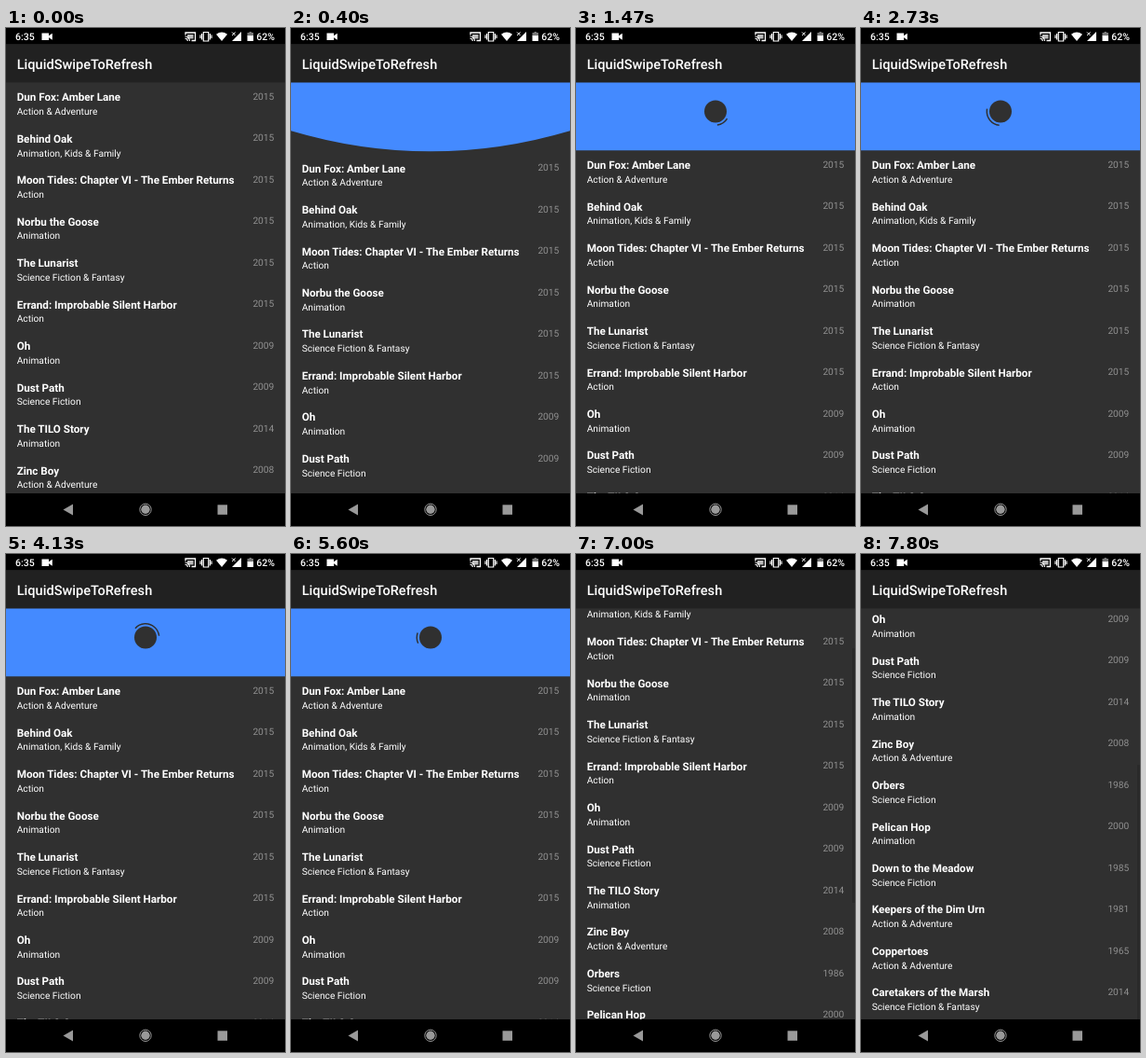
Recreate the animation shown at these times as an HTML page with a canvas. Size 300 by 534 pixels, loop 8000 ms.

```html
<!DOCTYPE html>
<html lang="en">
<head>
<meta charset="utf-8">
<title>LiquidSwipeToRefresh</title>
<style>
html, body { margin: 0; width: 100%; height: 100%; overflow: hidden; background: #000; }
canvas { display: block; width: 300px; height: 534px; }
</style>
</head>
<body>
<canvas id="stage"></canvas>
<script>
const canvas = document.getElementById('stage');
const ctx = canvas.getContext('2d');
const dpr = window.devicePixelRatio || 1;
canvas.width = 300 * dpr;
canvas.height = 534 * dpr;
ctx.textRendering = 'geometricPrecision';

const LOOP = 8000;
const BAR = 17.5, TOP = 58.33, BOTTOM = 499, ROW = 44.48;
const VIEW = BOTTOM - TOP;
const BASE = 72.9;        // height of the open refresh area
const RELEASE = 965;      // finger leaves the screen
const SPINNER_Y = 89.5;
const DARK = '#303030', BLUE = '#448aff', GREY = '#909090';

const movies = [
  ['Dun Fox: Amber Lane', 'Action & Adventure', 2015],
  ['Behind Oak', 'Animation, Kids & Family', 2015],
  ['Moon Tides: Chapter VI - The Ember Returns', 'Action', 2015],
  ['Norbu the Goose', 'Animation', 2015],
  ['The Lunarist', 'Science Fiction & Fantasy', 2015],
  ['Errand: Improbable Silent Harbor', 'Action', 2015],
  ['Oh', 'Animation', 2009],
  ['Dust Path', 'Science Fiction', 2009],
  ['The TILO Story', 'Animation', 2014],
  ['Zinc Boy', 'Action & Adventure', 2008],
  ['Orbers', 'Science Fiction', 1986],
  ['Pelican Hop', 'Animation', 2000],
  ['Down to the Meadow', 'Science Fiction', 1985],
  ['Keepers of the Dim Urn', 'Action & Adventure', 1981],
  ['Coppertoes', 'Action & Adventure', 1965],
  ['Caretakers of the Marsh', 'Science Fiction & Fantasy', 2014]
];
const CONTENT = movies.length * ROW;

const span = (t, a, b) => Math.min(1, Math.max(0, (t - a) / (b - a)));
const easeOut = (u, p = 3) => 1 - (1 - u) ** p;
const rad = deg => deg * Math.PI / 180;

function text(str, x, y, size, weight, color, align = 'left') {
  ctx.font = `${weight} ${size}px Roboto, sans-serif`;
  ctx.fillStyle = color;
  ctx.textAlign = align;
  ctx.fillText(str, x, y);
}

function rect(x, y, w, h, color) {
  ctx.fillStyle = color;
  ctx.fillRect(x, y, w, h);
}

function fill(path, color) {
  ctx.fillStyle = color;
  ctx.fill(new Path2D(path));
}

function stroke(path, color, width) {
  ctx.strokeStyle = color;
  ctx.lineWidth = width;
  ctx.stroke(new Path2D(path));
}

function disc(x, y, r, color) {
  ctx.fillStyle = color;
  ctx.beginPath();
  ctx.arc(x, y, r, 0, 7);
  ctx.fill();
}

// Height of the refresh area, sag of its edge, shift and scroll of the list.
function layout(t) {
  if (t < RELEASE) {
    const pull = easeOut(span(t, 130, 930));
    return { base: BASE * pull, sag: 31.2 * pull, shift: 107.4 * pull, scroll: 0 };
  }
  if (t < 5870) {
    const s = (t - RELEASE) / 1000;
    return {
      base: BASE,
      sag: t < 1870 ? 31.2 * Math.exp(-7 * s) * Math.cos(5 * Math.PI * s) : 0,
      shift: BASE + 34.4 * (1 - easeOut(span(t, RELEASE, 1215))),
      scroll: 0
    };
  }
  const base = BASE * (1 - span(t, 5870, 6395)) ** 1.3;
  const scroll = (CONTENT - VIEW) * easeOut(span(t, 6892, 7800), 2.3);
  return { base, sag: 0, shift: base - scroll, scroll };
}

function drawHill(edge, height) {
  if (height <= 0) return;
  const y = edge - height;
  fill(`M100 ${edge + 1}C130 ${edge} 132 ${y} 150 ${y}S170 ${edge} 200 ${edge + 1}Z`, DARK);
}

function drawSpinner(t) {
  if (t < 1060 || t > 5870) return;
  const sunk = 57 * (1 - easeOut(span(t, 1060, 1250)) + span(t, 5680, 5870) ** 2);
  disc(150, SPINNER_Y + sunk, 12, DARK);
  if (t < 1440 || t > 5680) return;

  const turns = Math.min(4, (t - 1440) / 1040);
  const n = Math.floor(turns), q = turns - n;
  const tail = 27 + 392 * n + 150 * Math.min(q, 0.5) + 634 * Math.max(0, q - 0.5);
  const sweep = 45 + 210 * Math.min(q, 1 - q);
  ctx.globalAlpha = 1 - span(t, 5610, 5680);
  ctx.strokeStyle = DARK;
  ctx.lineWidth = 1.5;
  ctx.beginPath();
  ctx.arc(150, SPINNER_Y, 14.7, rad(tail), rad(tail + sweep));
  ctx.stroke();
  ctx.globalAlpha = 1;
}

function drawList(t) {
  const { base, sag, shift, scroll } = layout(t);
  const edge = TOP + base;
  rect(0, BAR, 300, BOTTOM - BAR, DARK);
  ctx.save();
  ctx.beginPath();
  ctx.rect(0, BAR, 300, BOTTOM - BAR);
  ctx.clip();
  if (base > 0) fill(`M0 ${TOP}H300V${edge}Q150 ${edge + 2 * sag} 0 ${edge}Z`, BLUE);

  const peak = span(t, 1060, 1160) - span(t, 1160, 1300) ** 2
             + span(t, 5700, 5780) - span(t, 5780, 5870) ** 2;
  drawHill(edge + sag, 38 * peak);
  drawSpinner(t);

  movies.forEach(([title, genre, year], i) => {
    const y = TOP + i * ROW + shift;
    if (y < TOP - ROW || y > BOTTOM) return;
    text(title, 11.67, y + 19.9, 11.67, 700, '#fff');
    text(genre, 11.67, y + 34.7, 10.2, 400, '#fff');
    text(year, 288.3, y + 18.6, 10.2, 400, GREY, 'right');
  });

  if (scroll > 0) {
    const scale = VIEW / CONTENT;
    rect(297, TOP + scroll * scale, 3, VIEW * scale, 'rgba(0,0,0,.15)');
  }
  ctx.restore();
}

function drawStatusBar() {
  const W = '#fff';
  text('6:35', 10, 13.2, 10.5, 500, W);
  text('62%', 289, 13.2, 10.5, 500, W, 'right');
  // camera
  fill('M38.5 5.5H46V8.2L49.8 5.8V12.7L46 10.3V13H38.5Z', W);
  // cast
  stroke('M193 7.5V5H203.5V13.5H199.5', W, 1.3);
  rect(195, 7, 6.5, 4.5, '#bbb');
  stroke('M192.5 9A5 5 0 0 1 197.5 14M192.5 11.2A2.8 2.8 0 0 1 195.3 14', W, 1.1);
  // vibrate
  stroke('M212.3 4.5H217.7V14H212.3ZM210.6 6V12.5M219.4 6V12.5M209 7.5V11M221 7.5V11', W, 1.2);
  // wifi
  fill('M226 6.7Q232 2.5 238 6.7L232 14Z', W);
  // signal
  fill('M253 4V14H243Z', W);
  stroke('M243 4.5L246.5 8M246.5 4.5L243 8', W, 1);
  // battery
  rect(259.5, 5, 6.5, 4, '#777');
  rect(261.5, 4, 2.5, 1, '#777');
  rect(259.5, 8.2, 6.5, 5.8, W);
}

function drawNavBar() {
  const C = '#999';
  fill('M61.5 516.5L72 510.5V522.5Z', C);
  disc(150, 516.3, 4.7, C);
  ctx.strokeStyle = C;
  ctx.lineWidth = 1;
  ctx.beginPath();
  ctx.arc(150, 516.3, 6.2, 0, 7);
  ctx.stroke();
  rect(227.5, 511.3, 10.5, 10.5, C);
}

function draw(t) {
  ctx.setTransform(dpr, 0, 0, dpr, 0, 0);
  rect(0, 0, 300, 534, '#000');
  drawList(t);
  rect(0, BAR, 300, TOP - BAR, '#212121');
  text('LiquidSwipeToRefresh', 11.67, 43.6, 14.58, 500, '#fff');
  drawStatusBar();
  drawNavBar();
}

const start = performance.now();
function tick() {
  draw((performance.now() - start) % LOOP);
  requestAnimationFrame(tick);
}
tick();
</script>
</body>
</html>
```
